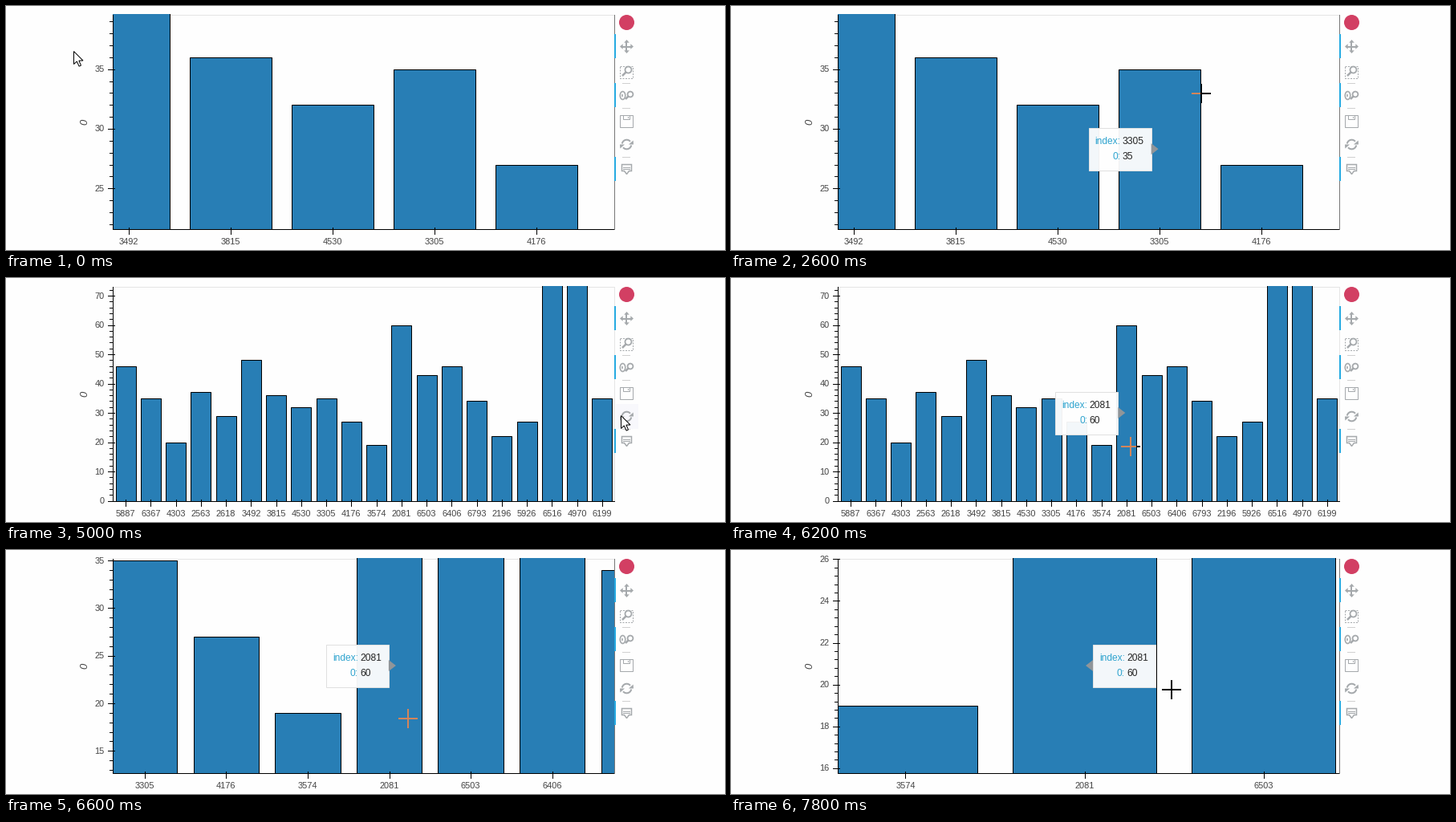
Animation of 896 by 304 pixels, one loop 8000 ms. Source, as a matplotlib script:

```python
import math
import numpy as np
import matplotlib.pyplot as plt
from matplotlib.animation import FuncAnimation
from matplotlib.patches import Circle, Ellipse, Polygon, Rectangle

W, H, DPI = 896, 304, 100
STEP, FRAMES = 200, 40
PT = 72 / DPI
LEFT, RIGHT, TOP, BOTTOM = 133, 758, 10, 277
RESET = 4800

BLUE, ORANGE = "#287eb5", "#d3855a"
CYAN, GREY, INK, PAPER = "#26aae1", "#a5a9ac", "#444444", "#fefefe"

NAMES = [5887, 6367, 4303, 2563, 2618, 3492, 3815, 4530, 3305, 4176,
         3574, 2081, 6503, 6406, 6793, 2196, 5926, 6516, 4970, 6199]
VALUES = [46, 35, 20, 37, 29, 48, 36, 32, 35, 27,
          19, 60, 43, 46, 34, 22, 27, 90, 85, 35]

# pointer way points: time, x, y
PATH = [(0, 84, 56), (1800, 85, 56), (2400, 513, 97), (2800, 659, 122),
        (3200, 733, 167), (3400, 733, 167), (4000, 759, 169),
        (5000, 766, 171), (6000, 497, 210), (6600, 501, 210),
        (7600, 522, 192), (7800, 549, 174)]

# zoom way points after the reset: time, factor, anchor x
ZOOM = [(6200, 1, 499.2), (6600, 3.25, 499.2), (7200, 7.14, 500.9)]

fig = plt.figure(figsize=(W / DPI, H / DPI), dpi=DPI, facecolor=PAPER)
ax = fig.add_axes([0, 0, 1, 1])
# whole numbers are pixel centres, nudged so that they snap to themselves
ax.set(xlim=(-0.49, W - 0.49), ylim=(H - 0.51, -0.51))
ax.axis("off")
plot_area = Rectangle((LEFT - 0.5, TOP - 0.5), RIGHT - LEFT + 1,
                      BOTTOM - TOP + 1, fc="none", ec="none")
ax.add_patch(plot_area)
live = []


def line(xs, ys, color="black", width=1, z=3):
    cap = "projecting" if width == 1 else "butt"
    return ax.plot(xs, ys, color=color, lw=width * PT, zorder=z,
                   solid_capstyle=cap, scalex=False, scaley=False)[0]


def shape(patch, fill="none", edge="none", width=1, z=3):
    patch.set(facecolor=fill, edgecolor=edge, zorder=z,
              linewidth=0 if edge == "none" else width * PT)
    return ax.add_patch(patch)


def box(x, y, w, h, **kw):
    return shape(Rectangle((x, y), w, h), **kw)


def poly(points, **kw):
    return shape(Polygon(points), **kw)


def label(x, y, text, size=11, color=INK, ha="center", z=4, **kw):
    return ax.text(x, y, text, fontsize=size * PT, color=color, ha=ha,
                   va=kw.pop("va", "baseline"), family="Liberation Sans",
                   zorder=z, **kw)


def lens(x, y, r, reach):
    shape(Circle((x, y), r), edge=GREY, width=1.8)
    line([x - r * 0.7, x - reach], [y + r * 0.7, y + reach], GREY, 2.5)


def pan_icon(x, y):
    for dx, dy in ((1, 0), (-1, 0), (0, 1), (0, -1)):
        line([x, x + 6 * dx], [y, y + 6 * dy], GREY, 2)
        bx, by = x + 4.8 * dx, y + 4.8 * dy
        poly([(x + 8.5 * dx, y + 8.5 * dy), (bx + 3.3 * dy, by + 3.3 * dx),
              (bx - 3.3 * dy, by - 3.3 * dx)], fill=GREY)


def box_zoom_icon(x, y):
    frame = box(x - 8, y - 7, 16, 15, edge=GREY)
    frame.set_linestyle((0, (2, 1.5)))
    lens(x + 2, y - 2, 4, 7.5)


def wheel_zoom_icon(x, y):
    shape(Ellipse((x - 5, y), 6.5, 10), edge=GREY, width=1.6)
    line([x - 5, x - 5], [y - 2, y + 1], GREY, 1.6)
    lens(x + 4.5, y - 1.5, 3.4, 6)


def save_icon(x, y):
    box(x - 8, y - 7, 16, 15, edge=GREY)
    box(x - 4, y - 7, 8, 5, edge=GREY)
    line([x + 2, x + 2], [y - 5, y - 4], GREY)


def reset_icon(x, y, r=5.8):
    for start, side in ((190, 1), (10, -1)):
        a = np.radians(np.linspace(start, start + 130, 30))
        line(x + r * np.cos(a), y + r * np.sin(a), GREY, 2)
        poly([(x + 2.5 * side, y), (x + 8.5 * side, y),
              (x + 8.2 * side, y - 5 * side)], fill=GREY)


def hover_icon(x, y):
    poly([(x - 6, y - 6), (x + 6, y - 6), (x + 6, y + 2), (x + 3, y + 2),
          (x, y + 6), (x - 3, y + 2), (x - 6, y + 2)], edge=GREY, width=1.5)
    for dy in (-3, -1):
        line([x - 4, x + 4], [y + dy, y + dy], GREY)


def draw_toolbar(x=773):
    shape(Circle((x, 20), 9.5), fill="#d23f63")
    icons = (pan_icon, box_zoom_icon, wheel_zoom_icon, save_icon, reset_icon,
             hover_icon)
    for i, icon in enumerate(icons):
        y = 50 + 30.6 * i
        icon(x, round(y))
        if icon in (pan_icon, wheel_zoom_icon, hover_icon):
            box(RIGHT - 0.5, round(y) - 15.5, 2, 30, fill=CYAN, z=5)
    for y in (95, 126, 187):
        line([x - 5, x + 4], [y, y], "#d0d0d0")


def zoomed(k, px, py):
    """Return x offset, x scale, y offset and y scale."""
    return (px + (LEFT - px) * k, (RIGHT - LEFT) / len(NAMES) * k,
            py + (BOTTOM - py) * k, 3.65 * k)


def view_at(t):
    if t < RESET:
        return zoomed(4.067, 354.6, 172.4)
    times, factors, anchors = zip(*ZOOM)
    k = math.exp(np.interp(t, times, np.log(factors)))
    return zoomed(k, np.interp(t, times, anchors), 210)


def pointer_at(t):
    times, xs, ys = zip(*PATH)
    return int(np.interp(t, times, xs)), int(np.interp(t, times, ys))


def in_plot(x, y):
    return LEFT < x < RIGHT and TOP < y < BOTTOM


def visible_bars(view):
    """Yield index, centre and clipped corners of each bar in view."""
    x0, sx, y0, sy = view
    for i, value in enumerate(VALUES):
        x1, x2, y1 = x0 + sx * (i + 0.1), x0 + sx * (i + 0.9), y0 - sy * value
        if x2 > LEFT and x1 < RIGHT and y1 < BOTTOM:
            yield (i, x0 + sx * (i + 0.5), max(x1, LEFT), max(y1, TOP),
                   min(x2, RIGHT), BOTTOM)


def draw_bars(view):
    x0, sx, y0, sy = view
    for i, value in enumerate(VALUES):
        bar = box(x0 + sx * (i + 0.1), y0 - sy * value, sx * 0.8, sy * value,
                  fill=BLUE, edge="black", z=2)
        bar.set_clip_path(plot_area)
        live.append(bar)


def y_interval(span):
    steps = [m * 10.0 ** p for p in range(-1, 3) for m in (1, 2, 5)]
    return min(steps, key=lambda s: abs(span / s - 6))


def draw_axes(view):
    x0, sx, y0, sy = view
    for i, name in enumerate(NAMES):
        x = x0 + sx * (i + 0.5)
        if LEFT <= x <= RIGHT:
            live.append(line([x, x], [275, 283]))
            live.append(label(x, 296.5, str(name)))

    low, high = (y0 - BOTTOM) / sy, (y0 - TOP) / sy
    minor = y_interval(high - low) / 5
    first, last = math.ceil(low / minor - 1e-6), math.floor(high / minor)
    for n in range(first, last + 1):
        y = y0 - sy * n * minor
        if n % 5:
            live.append(line([LEFT - 4, LEFT], [y, y]))
        else:
            live.append(line([LEFT - 6, LEFT + 2], [y, y]))
            live.append(label(122, y + 3.5, f"{n * minor:g}", ha="right"))


def hovered(t):
    x, y = pointer_at(t)
    if in_plot(x, y):
        for bar in visible_bars(view_at(t)):
            _, _, x1, y1, x2, y2 = bar
            if x1 <= x <= x2 and y1 <= y <= y2:
                return bar
    return None


def draw_tooltip(bar):
    i, cx, _, y1, _, y2 = bar
    cy = (y1 + y2) / 2
    side = 1 if cx < (LEFT + RIGHT) / 2 else -1
    edge = cx + 10.5 * side
    left = min(edge, edge + 78 * side)
    live.append(box(left, cy - 26.5, 78, 53, fill=(1, 1, 1, 0.95),
                    edge="#e0e0e0", z=6))
    live.append(poly([(edge - 9 * side, cy), (edge, cy - 7), (edge, cy + 7)],
                     fill="#909599", z=6))
    rows = (("index:", NAMES[i], -6), ("0:", VALUES[i], 13))
    for key, value, dy in rows:
        live.append(label(left + 40, cy + dy, key, 12, "#2fa4cf", "right", 7))
        live.append(label(left + 42, cy + dy, str(value), 12, "#222222",
                          "left", 7))


def draw_cross(x, y, view):
    for w, h in ((24, 2), (2, 24)):
        a, b = x - w / 2 - 0.5, y - h / 2 - 0.5
        live.append(box(a, b, w, h, fill="black", z=9))
        # the pointer inverts what lies beneath it
        for _, _, x1, y1, x2, y2 in visible_bars(view):
            p, q = max(a, x1), max(b, y1)
            r, s = min(a + w, x2), min(b + h, y2)
            if r > p and s > q:
                live.append(box(p, q, r - p, s - q, fill=ORANGE, z=10))


def draw_arrow(x, y):
    outline = [(0, 0), (0, 16), (3.8, 12.5), (6.6, 18.6), (9, 17.5),
               (6.4, 11.6), (11.5, 11.5)]
    live.append(poly([(x + a, y + b) for a, b in outline],
                     fill="white", edge="black", z=10))


def draw(n):
    while live:
        live.pop().remove()
    t = n * STEP
    view = view_at(t)
    x, y = pointer_at(t)

    draw_bars(view)
    draw_axes(view)
    if view[1] > 32:
        live.append(line([RIGHT, RIGHT], [TOP, BOTTOM], "#777777"))
    # the tooltip trails the pointer by one step
    bar = hovered(max(t - STEP, 0))
    if bar:
        draw_tooltip(bar)
    if in_plot(x, y):
        draw_cross(x, y, view)
    else:
        if x > 763:
            live.append(box(759.5, 156.5, 28, 31, fill="#f8f8fc", z=1))
        draw_arrow(x, y)
    return live


line([LEFT, RIGHT], [TOP, TOP], "#e5e5e5", z=1)
line([RIGHT, RIGHT], [TOP, BOTTOM], "#e5e5e5", z=1)
line([LEFT, LEFT], [TOP, BOTTOM])
line([LEFT, RIGHT], [BOTTOM, BOTTOM])
label(98, 143.5, "0", 13, rotation=90, va="center", style="italic")
draw_toolbar()

anim = FuncAnimation(fig, draw, frames=FRAMES, interval=STEP,
                     init_func=lambda: draw(0), repeat=True, repeat_delay=0)
plt.show()
```
